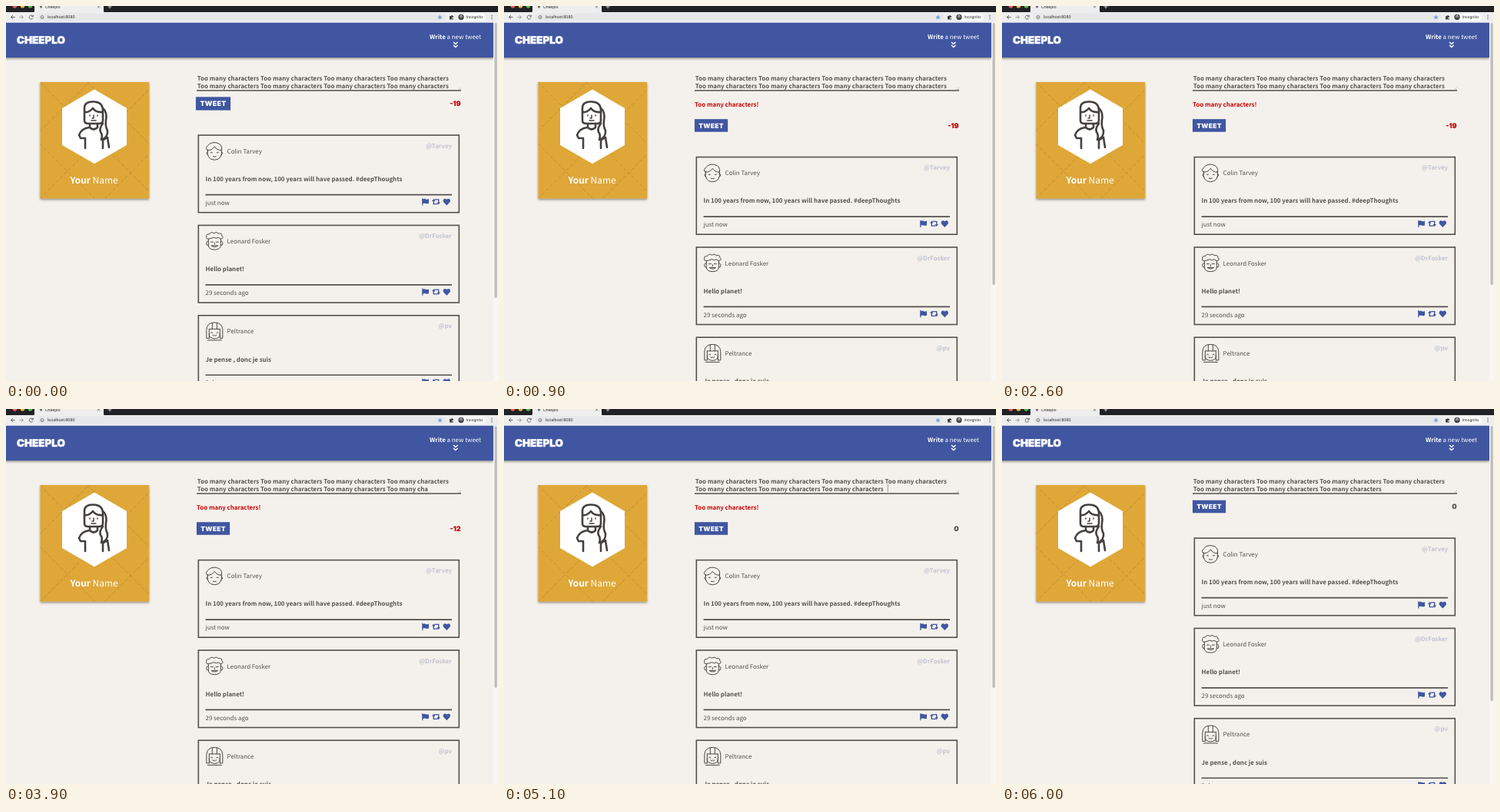
These frames come from a looping animation (640 px wide and 488 px high, 6100 ms). An HTML page:

```html
<!DOCTYPE html>
<html lang="en">
<head>
<meta charset="utf-8">
<title>Cheeplo</title>
<style>
html, body { margin: 0; width: 100%; height: 100%; overflow: hidden; background: #f4f1ec; }
svg { display: block; }
text { font: 300 7.9px "Noto Sans CJK JP", "Noto Sans CJK SC", "Open Sans", sans-serif; fill: #545149; text-rendering: geometricPrecision; white-space: pre; }
.bold { font-weight: 700; }
.block { font: 900 9px Inter, Roboto, sans-serif; }
.chrome { font: 400 5.4px Roboto, sans-serif; fill: #333; }
.white { fill: #fff; }
.red { fill: #c00; }
.handle { fill: #c0c3d2; text-anchor: end; }
.line { fill: none; stroke: #55504c; stroke-width: 1.6; }
.face { fill: none; stroke: #4a4644; stroke-width: 1; stroke-linecap: round; stroke-linejoin: round; }
.icon { fill: #4056a1; }
.dash { fill: none; stroke: #b98b36; stroke-width: .8; stroke-dasharray: 5 2.5; }
.girl { fill: none; stroke: #45413f; stroke-width: 2.6; stroke-linecap: round; stroke-linejoin: round; }
</style>
</head>
<body>
<svg width="640" height="488" viewBox="0 0 640 488">
  <defs>
    <filter id="shadow" x="-10%" y="-10%" width="120%" height="130%">
      <feDropShadow dx="0" dy="1.5" stdDeviation="1.5" flood-color="#000" flood-opacity=".45"/>
    </filter>
    <clipPath id="panel"><rect x="44.5" y="99" width="141.5" height="151.5"/></clipPath>
    <clipPath id="reveal"><rect id="window" x="240" y="116" width="360" height="0"/></clipPath>
  </defs>
  <rect width="640" height="488" fill="#f4f1ec"/>

  <g id="cards"></g>

  <g id="compose">
    <text class="bold" x="248.8" y="96.6" id="row1"></text>
    <text class="bold" x="248.8" y="106.9" id="row2"></text>
    <path id="caret" d="M499.3 98V108" stroke="#777" stroke-width=".7"/>
    <path class="line" d="M248 110H592"/>
    <path d="M588.5 109L591.5 106M590.5 109L591.5 108" stroke="#999" stroke-width=".6"/>
    <g clip-path="url(#reveal)"><text class="bold red" x="248" y="131.2">Too many characters!</text></g>
    <g id="controls">
      <g id="button">
        <rect x="-21.6" y="-8.3" width="43.2" height="16.6" fill="#4056a1"/>
        <text class="block white" x="0" y="3.1" text-anchor="middle" style="font-size:8.5px;letter-spacing:.25px">TWEET</text>
      </g>
      <text class="block" id="counter" x="591.6" y="130.2" text-anchor="end"></text>
    </g>
  </g>

  <g filter="url(#shadow)"><rect x="44.5" y="99" width="141.5" height="151.5" fill="#dfa739"/></g>
  <path class="dash" clip-path="url(#panel)" d="M44 163L108 99M44 251L196 99M128 251L188 191M44 179L116 251M44 99L196 251M106 99L188 181"/>
  <path fill="#fff" d="M115 108.5L157 133V181L115 205.2L73 181V133Z"/>
  <g class="girl">
    <path d="M102 139V133Q102 124.500 113 124.500Q126 124.500 126 136V149Q126 153 121 153H107Q102 153 102 149V138Q108 139 113 133Q117 139 126 138"/>
    <path d="M126 133Q132 138 130 149Q129 157 132 162Q133 171 124 174Q126 168 123 164Q121 159 126 153"/>
    <path d="M109 153V158Q98 159 95 168L97 172H103V185M119 153V158M109 158Q114 163 119 158M127 174L132 171L134 184M126 174V185M103 178V185"/>
    <path stroke-width="1.500" d="M109 142V143M119 142V143M114 142V146H112M111 149H117"/>
  </g>
  <text x="83.500" y="230.6" class="white" style="font-size:11.9px"><tspan class="bold">Your</tspan> Name</text>

  <g filter="url(#shadow)"><rect x="-5" y="21.5" width="639" height="45.500" fill="#4056a1"/></g>
  <text class="block white" x="14" y="48.7" style="font-size:13.4px" stroke="#fff" stroke-width=".4">CHEEPLO</text>
  <text class="white" x="551" y="43.4"><tspan class="bold">Write</tspan> a new tweet</text>
  <path d="M582 47L584.8 49.600L587.600 47M582 51L584.8 53.600L587.600 51" fill="none" stroke="#fff" stroke-width="1.4"/>

  <rect x="634" y="21" width="6" height="467" fill="#f8f7f6"/>
  <rect id="thumb" x="635.4" y="22" width="3.4" rx="1.7" fill="#bdbdbd"/>

  <rect width="640" height="9" fill="#202124"/>
  <path d="M34 9Q37 9 37 6V0H127V6Q127 9 130 9Z" fill="#eeeeef"/>
  <circle cx="11.500" cy="0" r="2.8" fill="#ee5b52"/>
  <circle cx="21.500" cy="0" r="2.8" fill="#e9b13c"/>
  <circle cx="31.500" cy="0" r="2.8" fill="#4fbb47"/>
  <circle cx="45.500" cy="1" r="1.700" fill="#777"/>
  <text class="chrome" x="51" y="2.800">Cheeplo</text>
  <path d="M119 -.500L122 2.500M122 -.500L119 2.500" stroke="#555" stroke-width=".7"/>
  <path d="M132.500 1H137.500M135 -1.500V3.500" stroke="#ddd" stroke-width=".8"/>
  <rect y="8" width="640" height="13.500" fill="#eeeeef"/>
  <rect x="41" y="9.500" width="531" height="10" rx="5" fill="#e6e7e9"/>
  <g fill="none" stroke="#555" stroke-width=".9">
    <path d="M11.500 14.500H6.500M9 12L6.500 14.500L9 17"/>
    <path stroke="#999" d="M17.500 14.500H22.500M20 12L22.500 14.500L20 17"/>
    <path d="M35 13.500A2.500 2.500 0 1 0 35 15.700M35.300 11.700V13.800H33.200"/>
    <circle cx="47" cy="14.500" r="2" stroke-width=".7"/>
    <path d="M47 14.200V15.700" stroke-width=".6"/>
  </g>
  <text class="chrome" x="54" y="16.400">localhost:8080</text>
  <path d="M564.500 11.500L565.400 13.500L567.600 13.700L566 15.200L566.500 17.300L564.500 16.200L562.500 17.300L563 15.200L561.400 13.700L563.600 13.500Z" fill="#7b9de0"/>
  <path d="M577 13H579A1 1 0 1 1 581 13H582V15A1 1 0 1 0 582 16V17.500H577Z" fill="#444"/>
  <rect x="587" y="9.500" width="37" height="10" rx="5" fill="#fafafa"/>
  <circle cx="592" cy="14.500" r="3.700" fill="#45484d"/>
  <path d="M590 14H594M591 13L591.500 12H592.500L593 13" stroke="#fff" stroke-width=".7" fill="none"/>
  <text class="chrome" x="598.500" y="16.400" style="font-size:5.200px">Incognito</text>
  <g fill="#555"><circle cx="632" cy="12.200" r=".7"/><circle cx="632" cy="14.500" r=".7"/><circle cx="632" cy="16.800" r=".7"/></g>
</svg>
<script>
const LOOP = 6100, STEP = 100, ERROR_HEIGHT = 28.5, OVERFLOW = 19;
const $ = id => document.getElementById(id);
const set = (id, attrs) => { for (const k in attrs) $(id).setAttribute(k, attrs[k]); };

// Line faces, drawn around their own centre.
const faces = [
  'M-9 -2Q-11 11 0 11.500Q11 11 9 -2M-9 -1Q-13 -3 -9 -7Q-5 -12 2 -11Q11 -9 9 -1Q3 -1 0 -6Q-3 -1 -9 -1M-9 1Q-12 2 -9 5M9 1Q12 2 9 5M-5 2H-3M3 2H5M-2 7Q0 8 2 7',
  'M-8 -3V5Q-8 11 0 11Q8 11 8 5V-3M-8 -3Q-12 -3 -10.500 -6Q-11 -10 -7 -9Q-5 -13 -1 -10.500Q3 -13 5 -10Q10 -11 9.500 -7Q13 -4 8 -3Q5 -6 2 -4Q-1 -6 -4 -4ZM-8 0Q-12 0 -10 5Q-8 6 -8 5M8 0Q12 0 10 5Q8 6 8 5M-5 1H-2M2 1H5M0 2V4M-4 6Q0 9 4 6Z',
  'M-7 -3V4Q-7 9 0 9.500Q7 9 7 4V-3M-7 9H-10.500V-2Q-10 -11.500 0 -11.500Q10 -11.500 10.500 -2V9H7M-7 -3H7M-3 -11V-3M3 -11V-3M-7 9V3M7 9V3M-5 2Q-4 0 -2.500 2M2.500 2Q4 0 5 2M-2.500 5Q-1 7 0 5Q1 7 2.500 5M-9 11.500H9'
];
const posts = [
  ['Colin Tarvey', '@Tarvey', 'In 100 years from now, 100 years will have passed. #deepThoughts', 'just now'],
  ['Leonard Fosker', '@DrFosker', 'Hello planet!', '29 seconds ago'],
  ['Peltrance', '@pv', 'Je pense , donc je suis', '2 days ago']
];
const icons = `<g class="icon">
  <path d="M541.200 82.500H542.400V83.500Q544.500 82.600 546.300 83.600Q548 84.200 550 83.300V89Q548 90 546 89.200Q544 88.500 542.400 89.300V91.700H541.200Z"/>
  <path d="M554 86.200L556.300 83.200L558.600 86.200H557V89.200H561L562.200 90.500H555.600V86.200ZM565 87.700L562.700 90.700L560.400 87.700H562V84.700H558L556.800 83.400H563.400V87.700Z"/>
  <path d="M573.300 91.700L569.200 87.400C567.300 84.600 570.500 81.200 573.300 84C576.100 81.200 579.300 84.600 577.400 87.400Z"/>
</g>`;
$('cards').innerHTML = posts.map(([name, handle, body, age], i) => `
  <g transform="translate(0 ${167.8 + i * 117.3})">
    <rect class="line" x="250.300" y=".3" width="339" height="100.600"/>
    <path class="face" transform="translate(271.300 21)" d="${faces[i]}"/>
    <text x="287.600" y="24">${name}</text>
    <text class="bold handle" x="580" y="17">${handle}</text>
    <text class="bold" x="259.600" y="60.200">${body}</text>
    <path class="line" d="M259.500 77.800H580"/>
    <text x="259.600" y="91">${age}</text>
    ${icons}
  </g>`).join('');

const row = Array(4).fill('Too many characters').join(' ');
$('row1').textContent = row;

const clamp = (v, lo, hi) => Math.min(hi, Math.max(lo, v));
const swing = x => .5 - Math.cos(Math.PI * clamp(x, 0, 1)) / 2;

function draw(now) {
  const t = Math.floor(now % LOOP / STEP) * STEP;
  const open = swing((t - 616) / 280) - swing((t - 5100) / 300);
  const shift = ERROR_HEIGHT * open;
  const deleted = clamp((t - 3200) / STEP, 0, OVERFLOW);
  const hover = t < 800;

  set('cards', { transform: `translate(0 ${shift})` });
  set('controls', { transform: `translate(0 ${shift})` });
  set('window', { height: shift });
  set('thumb', { height: 358 - 17 * open });
  set('button', { transform: `translate(269.5 127) scale(${hover ? 1.045 : 1})` });
  set('caret', { opacity: t >= 5000 && t < 5500 ? 1 : 0 });
  $('row2').textContent = row.slice(0, row.length - deleted);
  $('counter').textContent = deleted - OVERFLOW;
  $('counter').classList.toggle('red', deleted < OVERFLOW);
  requestAnimationFrame(() => draw(performance.now()));
}
draw(performance.now());
</script>
</body>
</html>
```
